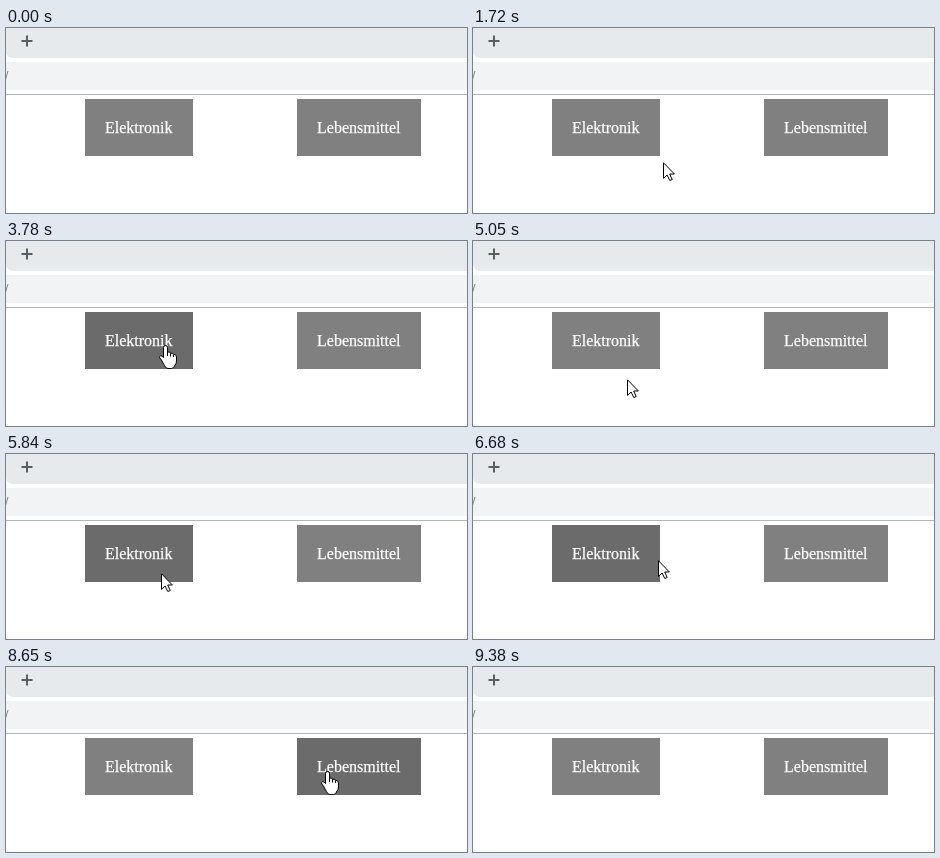
Recreate the animation shown at these times as an HTML page. Size 461x185 px, loop 9.85 s.

```html
<!DOCTYPE html>
<html lang="de">
<head>
<meta charset="utf-8">
<style>
  html, body { margin: 0; width: 100%; height: 100%; overflow: hidden; background: #fff; }
  svg { position: absolute; left: 0; top: 0; }
  .button {
    position: absolute; top: 71px; padding: 20px; white-space: nowrap;
    font: 16px/17px "Liberation Serif", "Times New Roman", serif;
    color: #fff; background: #808080; -webkit-text-stroke: .25px #fff;
  }
  .button.hover { background: #6b6b6b; }
  #arrow, #hand { fill: #fff; stroke: #000; stroke-linejoin: round; }
</style>
</head>
<body>
<svg width="461" height="67">
  <path d="M0 0H461V30H8Q0 30 0 22Z" fill="#e6eaed"/>
  <path d="M15.5 13H26.5M21 7.5V18.5" stroke="#5a5e62" stroke-width="2"/>
  <rect y="34" width="461" height="28" fill="#f1f3f4"/>
  <path d="M-.5 51.5L2 43" stroke="#80868b"/>
  <rect y="66" width="461" height="1" fill="#b6b6b6"/>
</svg>

<div class="button" style="left: 79px; width: 68px">Elektronik</div>
<div class="button" style="left: 291px; width: 84px">Lebensmittel</div>

<svg width="461" height="185">
  <path id="arrow" d="M.5.8V16.4L4.1 13L6.8 18.5L9.2 17.5L6.7 12H11.4Z"/>
  <g id="hand">
    <path d="M.5.5Q2.5.5 2.5 2.5V7Q5 6.5 5.5 8.3Q8 7.7 8.4 9.3Q11.5 9 11.5 12V16Q11.5 18.5 10 20Q9 23.5 6.5 23.5H3Q.5 23.5 -.5 20.5Q-2 18 -3 16Q-4 14 -5.2 13Q-6 11.5 -4.5 10.8Q-3 10.5 -1.5 12.5V2.5Q-1.5.5 .5.5Z"/>
    <path d="M2.5 7V11M5.5 8.3V11.5M8.4 9.3V12" fill="none"/>
  </g>
</svg>
<script>
const LOOP = 9850;
const ENTRY = [322, 186];

// Pointer strokes: start and end in ms, then where they lead
const strokes = [
  [440, 1440, 215, 145],
  [1440, 1720, 191, 135],
  [1720, 1820, 187, 131],
  [2000, 2370, 177, 119],
  [2600, 2850, 174, 116],
  [3020, 3450, 163, 110],
  [3540, 3780, 159, 104],
  [4190, 5050, 154, 138],
  [5220, 5600, 155, 121],
  [5790, 6270, 155, 103],
  [6490, 7350, 291, 120],
  [7440, 8280, 321, 98],
  [8600, 9380, 330, 190]
];

function pointerAt(t) {
  let [x, y] = ENTRY;
  for (const [start, end, toX, toY] of strokes) {
    const u = Math.min(1, Math.max(0, (t - start) / (end - start)));
    x += (toX - x) * u;
    y += (toY - y) * u;
  }
  return [Math.floor(x), Math.floor(y)];
}

const arrow = document.getElementById("arrow");
const hand = document.getElementById("hand");
const buttons = document.querySelectorAll(".button");

function draw() {
  const [x, y] = pointerAt(performance.now() % LOOP);
  let overText = false;
  for (const button of buttons) {
    const box = button.getBoundingClientRect();
    const inside = inset =>
      x >= box.left + inset && x < box.right - inset &&
      y >= box.top + inset && y < box.bottom - inset + 1;
    button.classList.toggle("hover", inside(0));
    overText ||= inside(20);
  }
  arrow.style.display = overText ? "none" : "";
  hand.style.display = overText ? "" : "none";
  for (const shape of [arrow, hand]) shape.setAttribute("transform", `translate(${x} ${y})`);
  requestAnimationFrame(draw);
}
draw();
</script>
</body>
</html>
```
